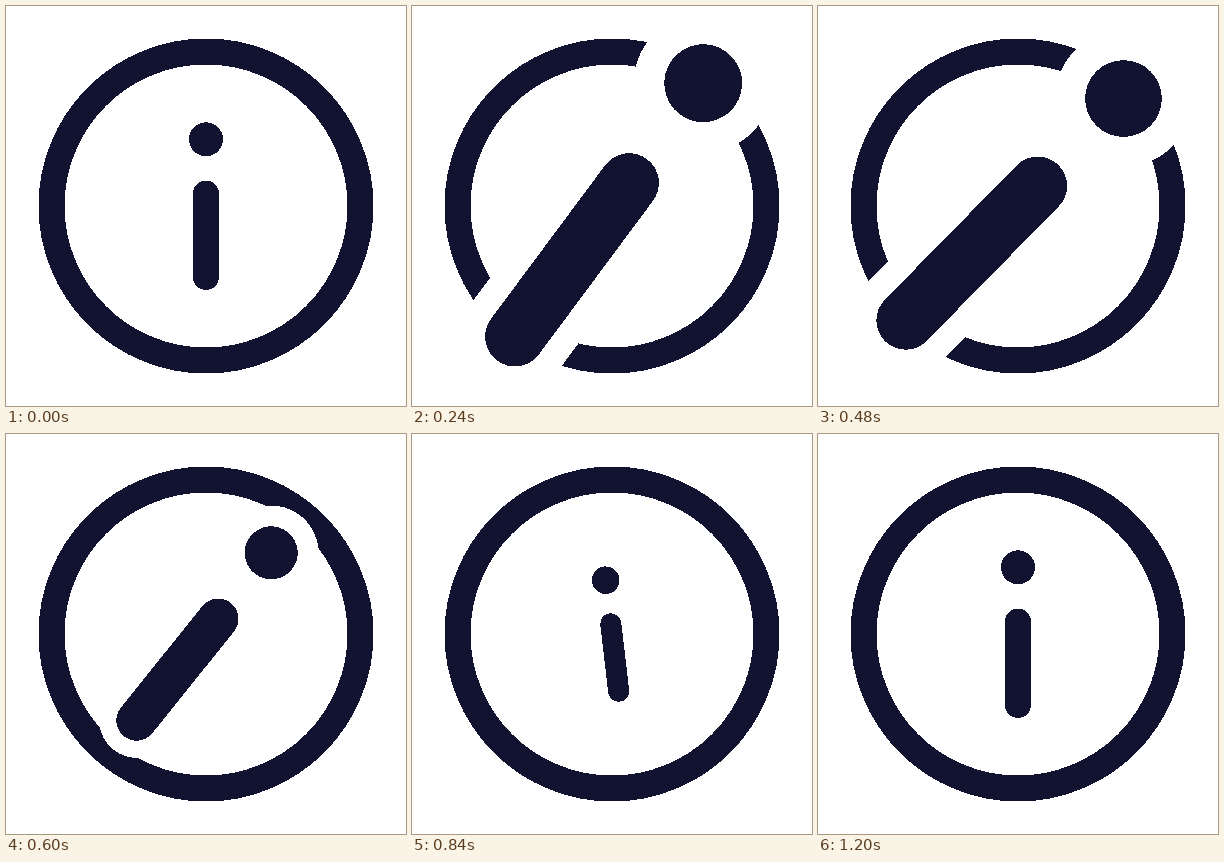
An HTML page for the animation above (3230 ms loop, 400 by 400 pixels).

```html
<!DOCTYPE html>
<html lang="en">
<head>
<meta charset="utf-8">
<title>Info icon</title>
<style>
  html, body { margin: 0; width: 100%; height: 100%; overflow: hidden; background: #fff; }
  svg { display: block; width: 100vw; height: 100vh; shape-rendering: crispEdges; }
  .ink { fill: #121331; stroke: #121331; }
  .paper { fill: #fff; stroke: #fff; }
  circle { stroke: none; }
  line { stroke-linecap: round; }
</style>
</head>
<body>
<svg viewBox="-200 -200 400 400">
  <circle class="ink" r="167"/>
  <circle class="paper" r="141"/>
  <g id="letter">
    <!-- Halo that cuts the ring -->
    <g class="paper">
      <circle cy="-66.7" r="30.3"/>
      <line y1="-12.5" y2="71" stroke-width="48"/>
    </g>
    <g class="ink">
      <circle cy="-66.7" r="17"/>
      <line y1="-12.5" y2="71" stroke-width="26"/>
    </g>
  </g>
</svg>
<script>
const letter = document.getElementById('letter');
const LOOP = 3230, STEP = 30;

// Cubic Bezier easing with flat ends: control points (x1, 0) and (x2, 1).
function ease(x1, x2) {
  return x => {
    let lo = 0, hi = 1;
    for (let i = 0; i < 30; i++) {
      const u = (lo + hi) / 2, v = 1 - u;
      const at = 3 * u * v * v * x1 + 3 * u * u * v * x2 + u * u * u;
      if (at < x) lo = u; else hi = u;
    }
    return lo * lo * (3 - 2 * lo);
  };
}

const smooth = x => x * x * (3 - 2 * x);

// Keys: [time, value, easing towards this key]
const SCALE = [
  [0, 1], [240, 2.293, smooth], [418, 2.293, smooth],
  [784, 0.8, ease(0.71, 0.29)], [1170, 1, smooth]
];
const ANGLE = [
  [0, 0], [336, 45, ease(0.37, 0.63)], [417, 45, smooth],
  [990, -11.8, ease(0.7, 0.377)], [1200, 0, smooth]
];

function sample(keys, t) {
  for (let i = 1; i < keys.length; i++) {
    const [t0, v0] = keys[i - 1], [t1, v1, curve] = keys[i];
    if (t < t1) return v0 + (v1 - v0) * curve((t - t0) / (t1 - t0));
  }
  return keys[keys.length - 1][1];
}

function draw(t) {
  letter.setAttribute('transform', `rotate(${sample(ANGLE, t)}) scale(${sample(SCALE, t)})`);
}

const start = performance.now();
function tick() {
  const t = (performance.now() - start) % LOOP;
  draw(Math.floor(t / STEP) * STEP);
  requestAnimationFrame(tick);
}
tick();
</script>
</body>
</html>
```
